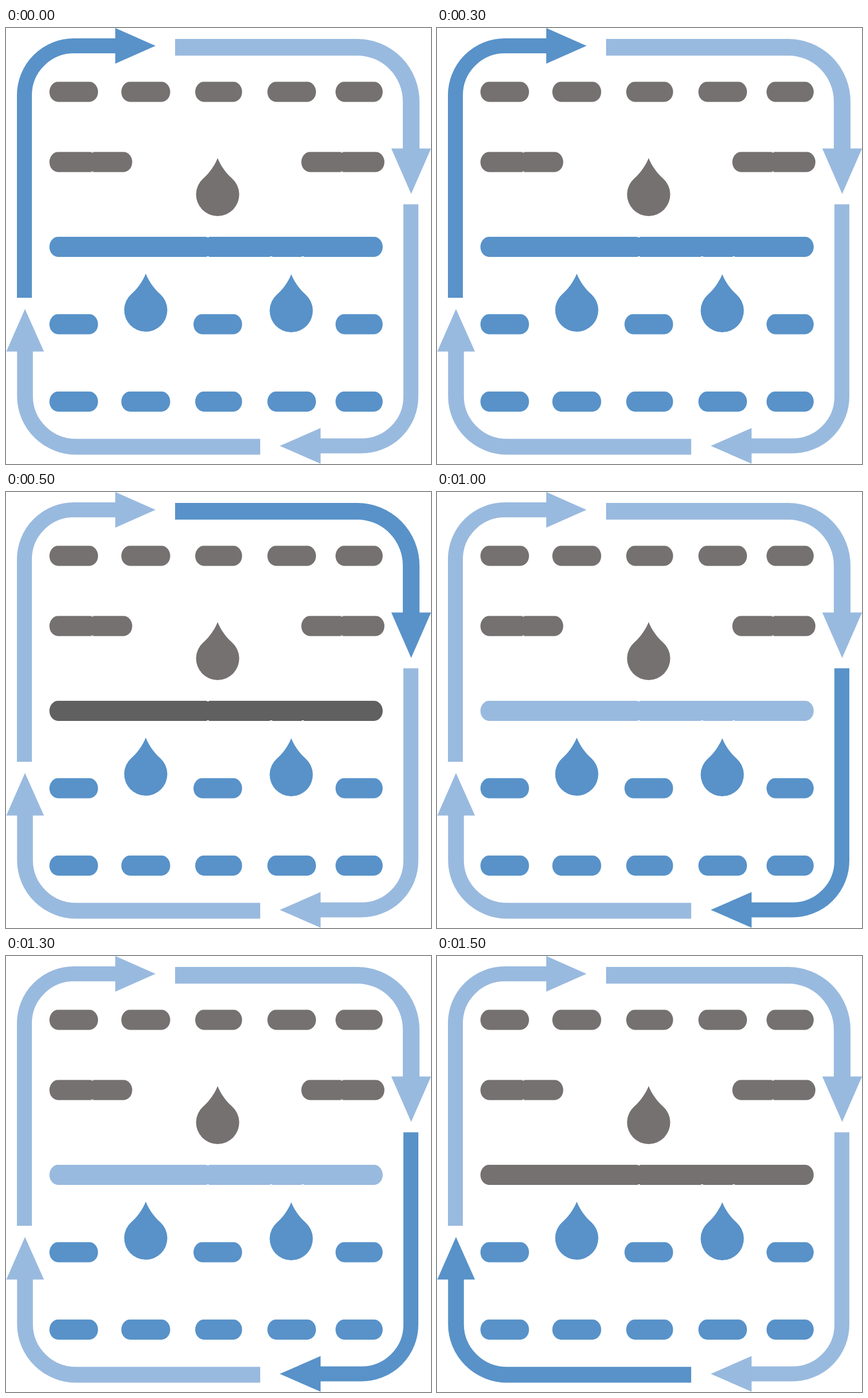
An HTML page that plays this animation: 739x758 px, repeating every 2 s.

```html
<!DOCTYPE html>
<html lang="en">
<head>
<meta charset="utf-8">
<title>Water cycle</title>
<style>
  html, body { margin: 0; width: 100%; height: 100%; overflow: hidden; background: #fff; }
  svg { display: block; width: 100%; height: 100%; }
</style>
</head>
<body>
<svg id="stage" viewBox="0 0 739 758"></svg>
<script>
const BLUE = '#5892c9', LIGHT = '#99badf', GRAY = '#767171', DARK = '#606060';
const STEP = 500;
const stage = document.getElementById('stage');

function add(tag, attrs, parent = stage) {
  const node = document.createElementNS('http://www.w3.org/2000/svg', tag);
  for (const key in attrs) node.setAttribute(key, attrs[key]);
  return parent.appendChild(node);
}

function arrow(shaft, width, head) {
  const group = add('g', {});
  add('path', { d: shaft, fill: 'none', stroke: 'currentColor', 'stroke-width': width }, group);
  add('path', { d: head, fill: 'currentColor' }, group);
  return group;
}

const pill = (y, color, [left, right]) =>
  add('rect', { x: left, y, width: right - left, height: 35, rx: 15, ry: 17.5, fill: color });

const drop = (x, y, color) => add('path', {
  d: `M${x} ${y}c5 13 15 27 25 35.5a37.5 37.5 0 1 1-50 0c10-8.5 20-22.5 25-35.5z`, fill: color
});

// Small seam where neighbouring pills meet
const notch = (x, y) => add('rect', { x: x - 2, y, width: 4, height: 1, fill: '#fff' });

const arrows = [
  arrow('M32 469V117A86 86 0 0 1 118 31H191', 26, 'M190 0L260 31L190 62z'),
  arrow('M294 33.5H611A93.5 94.5 0 0 1 704.5 128V210', 29, 'M670 209.5H739L704.5 288.5z'),
  arrow('M704 306.5V641A86 85.5 0 0 1 618 726.5H546', 26, 'M547 695.5V757.5L476 726.5z'),
  arrow('M442 728H122A89 88 0 0 1 33 640V562', 27.5, 'M0.5 562.5H66L33 488.5z')
];

const columns = [[75.5, 160], [200.5, 285.5], [329, 410.5], [454.5, 539], [573, 655]];
columns.forEach(span => {
  pill(93.5, GRAY, span);
  pill(632, BLUE, span);
});
[[75.5, 219.5], [513.5, 658]].forEach(span => pill(215.5, GRAY, span));
[columns[0], [326, 410.5], columns[4]].forEach(span => pill(497.5, BLUE, span));
const bar = pill(363, BLUE, [75.5, 655]);

[150, 584].forEach(x => { notch(x, 215.5); notch(x, 249.5); });
notch(351, 363);
[351, 461, 516].forEach(x => notch(x, 397));

drop(368, 226, GRAY);
drop(243, 427, BLUE);
drop(496, 428, BLUE);

const barColors = [BLUE, DARK, LIGHT, GRAY];
const start = performance.now();

function draw() {
  const phase = Math.floor((performance.now() - start) / STEP) % 4;
  arrows.forEach((group, i) => group.setAttribute('color', i === phase ? BLUE : LIGHT));
  bar.setAttribute('fill', barColors[phase]);
  requestAnimationFrame(draw);
}
draw();
</script>
</body>
</html>
```
